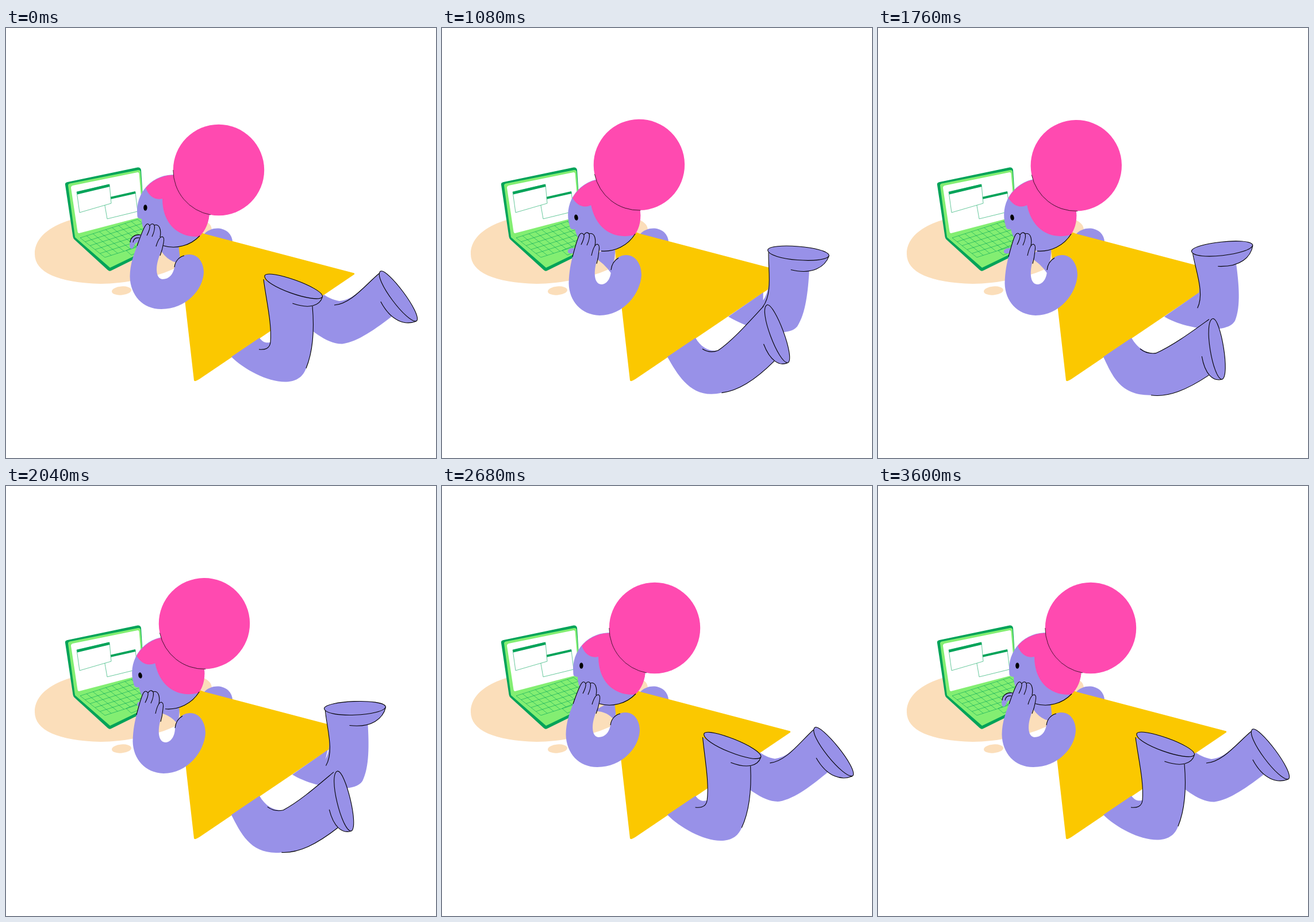
Recreate the animation shown at these times as an HTML page with a canvas. Size 748 px wide and 748 px high, loop 3640 ms.

```html
<!DOCTYPE html>
<html lang="en">
<head>
<meta charset="utf-8">
<title>Reading on the floor</title>
<style>
  html, body { margin: 0; width: 100%; height: 100%; overflow: hidden; background: #fff; }
  canvas { display: block; width: 748px; height: 748px; }
</style>
</head>
<body>
<canvas width="748" height="748"></canvas>
<script>
const ctx = document.querySelector('canvas').getContext('2d');
const LOOP = 3640, STEP = 40;
const SKIN = '#9891e8', PINK = '#ff4ab0', YELLOW = '#fbc800', PEACH = '#fbdeba';
const LIME = '#83ee72', GREEN = '#00a359', INK = '#000';
const rad = Math.PI / 180;

const fill = (d, color) => { ctx.fillStyle = color; ctx.fill(new Path2D(d)); };
const line = (d, color = INK, width = 1.1) => {
  ctx.strokeStyle = color;
  ctx.lineWidth = width;
  ctx.stroke(new Path2D(d));
};
const oval = (x, y, rx, ry, angle, color) => {
  ctx.beginPath();
  ctx.ellipse(x, y, rx, ry, angle * rad, 0, 7);
  ctx.fillStyle = color;
  ctx.fill();
};
const placed = (draw, x, y, angle) => {
  ctx.save();
  ctx.translate(x, y);
  ctx.rotate(angle * rad);
  draw();
  ctx.restore();
};

const lerp = (a, b, k) => a + (b - a) * k;
// Blends two paths that share the same commands.
const mix = (a, b, k) => {
  const ends = b.match(/-?[\d.]+/g);
  let i = 0;
  return a.replace(/-?[\d.]+/g, n => lerp(+n, +ends[i++], k).toFixed(2));
};
// Symmetric ease in and out between two times.
const ease = (t, from, to, power = 3) => {
  const u = Math.min(1, Math.max(0, (t - from) / (to - from)));
  return u < .5 ? (2 * u) ** power / 2 : 1 - (2 - 2 * u) ** power / 2;
};
// Turns a point around a joint and returns it as path text.
const joint = (cx, cy, angle) => (x, y) => {
  const c = Math.cos(angle * rad), s = Math.sin(angle * rad), dx = x - cx, dy = y - cy;
  return ` ${(cx + dx * c - dy * s).toFixed(2)} ${(cy + dx * s + dy * c).toFixed(2)} `;
};

function drawLaptop() {
  fill('M103 273Q102 269 107 268L229 242.5Q234 242 235 247L240 325L262 383L183 422Q180 424 177 421L119 368Q117 366 116.5 363Z', GREEN);
  fill('M108 274Q108 271 111 270.5L230 247Q234 247 234 250L240 325L262 378L181 417L120 364Z', LIME);
  fill('M113 278Q113 275 116 274L229 251Q231 251 231.5 253L238 328L127 357Q125 357 124.5 354Z', '#fff');
  line('M172 309L176 332L229 319L225 286L172 298Z', GREEN, .6);
  fill('M172 296L225 284L225.5 288L172 300Z', GREEN);
  fill('M123 285L180 272L183 305L128 321Z', '#fff');
  line('M123 285L180 272L183 305L128 321Z', GREEN, .6);
  fill('M123 285L179.5 271.5L180.5 276L124 289.5Z', GREEN);

  const key = (u, v) => `${129 + 100 * u + 43 * v} ${365 - 32 * u + 34 * v}`;
  let grid = '';
  for (let i = 0; i <= 5; i++) grid += `M${key(0, i / 5)}L${key(1, i / 5)}`;
  for (let i = 0; i <= 9; i++) grid += `M${key(i / 9, 0)}L${key(i / 9, 1)}`;
  line(grid + 'M209 387L218 395L246 383L238 375Z', GREEN, .6);
}

function drawFarArm(t, head) {
  const hide = t < 2700 ? ease(t, 1700, 2300) : 1 - ease(t, 3200, 3600);
  const pose = (rest, low, tucked) => mix(mix(rest, low, head), tucked, hide);
  fill(pose(
    'M262 375Q278 407 302 409L304 370Z',
    'M262 398Q282 408 296 429L304 370Z',
    'M262 392Q287 390 301 409L304 370Z'), SKIN);
  fill(pose(
    'M235 359C224 358 217 365 216 372C214 380 216 384 219 384C223 383 222 376 228 373L240 375Z',
    'M235 383C224 382 219 385 219 388C218 391 222 393 226 392C228 392 229 392 230 392L240 392Z',
    'M244 370C235 370 233 372 233 375C233 379 235 380 237 380C238 380 239 380 240 380L245 380Z'), SKIN);
  ctx.globalAlpha = Math.max(0, 1 - 2 * head) * (1 - hide);
  line('M234 360C224 358 216 365 216 373M232 365C224 364 222 368 221 373');
  ctx.globalAlpha = 1;
}

function drawHead(t, turn) {
  const angle = -11.9 * turn;
  placed(() => {
    ctx.translate(-320, -364);
    fill('M228 318A63 63 0 1 1 260 373C244 362 236 350 236 332Q230 332 228.5 328Z', SKIN);
    fill('M243 278A63 63 0 0 1 354 318C354 337 347 353 336 363C300 365 272 341 272 297C258 300 248 292 243 278Z', PINK);
    line('M273 378.5A63 63 0 0 0 337 361.5');
    oval(242.4, 312.5, 3.2, 5.2, 0, INK);
  }, 320, 364, angle);

  // The bun swings a little further than the head, then settles.
  const u = (t - 660) / 460;
  const swing = u > 0 && u < 1 ? Math.sin(Math.PI * u) : 0;
  placed(() => {
    oval(50, -117, 79.2, 79.2, 0, PINK);
    line('M-29.2 -117A79.2 79.2 0 0 0 36 -39', INK, .7);
  }, 320 - 7 * swing, 364 - 4.8 * swing, angle);
}

function drawNearArm(drop) {
  fill(mix(
    'M228 379C233 365 238 350 243 343Q247 338 250 344Q254 338 258 343Q264 341 267 347Q270 354 268 364Q272 360 275 367C275 380 269 388 265 402C260 418 261 436 272 437C284 437 291 428 293 416C295 402 306 394 320 394C334 394 344 408 344 425C343 455 313 489 270 489C238 489 216 465 215.5 432C216 410 222 395 228 379Z',
    'M227 398C231 383 235 367 239 360Q243 354 247 360Q251 353 256 358Q262 356 265 362Q268 368 266 379Q270 373 273.5 380C274 392 270 400 267 414C264 430 266 446 278 446C288 445 294 434 294 421C297 403 308 395 321 395C336 395 347 410 347 430C345 462 316 500 274 500C242 499 221 475 220.5 444C221 424 224 410 227 398Z',
    drop), SKIN);
  line(mix(
    'M228 379C233 365 238 350 243 343Q247 338 250 344Q251 349 245 361M250 344Q254 338 258 343Q260 350 254 363M258 343Q264 341 267 347Q270 354 268 364M261 380Q266 363 272 363Q276 364 274 374Q272 386 268 396M293 416C294 406 301 398 310 396',
    'M227 398C231 383 235 367 239 360Q243 354 247 360Q248 365 242 377M247 360Q251 353 256 358Q258 365 252 378M256 358Q262 356 265 362Q268 368 266 379M260 396Q264 377 270 376Q275 377 273 388Q272 400 269 410M294 421C295 411 300 404 307 400',
    drop));
}

// Trouser opening: an ellipse with a cuff on the leg side.
function drawOpening(x, y, angle, cuff) {
  placed(() => {
    fill(cuff + 'L-50 0Z', SKIN);
    line(cuff);
    const rim = 'M-53.5 -2C-52 -15.5 50 -15.5 53.5 0C50 16 -52 16 -53.5 -2Z';
    fill(rim, SKIN);
    line(rim);
  }, x, y, angle);
}

function drawFarLeg(kick) {
  const turn = -59.9 * kick, at = joint(568, 498, turn);
  fill(`M498 502C530 522${at(555, 550)}${at(585, 549.5)}C${at(612, 546)}${at(645, 522)}${at(672, 501)}L${at(650, 427)}C${at(625, 447)}${at(608, 472)}${at(580, 475)}C${mix('570 473 562 470 553 464', '556 470 558 465 560 459', kick)}Z`, SKIN);
  line(`M${at(649, 427)}C${at(625, 447)}${at(600, 480)}${at(571, 482)}`);
  const [x, y] = at(682, 467).trim().split(' ').map(Number);
  drawOpening(x, y, 52.8 + turn, 'M53.5 1C48 20 28 36 -11 29.5');
}

function drawNearLeg(kick) {
  const turn = 61.4 * kick, at = joint(453, 580, turn);
  const heel = at(lerp(522, 515, kick), lerp(592, 589, kick));
  const back = `C${at(533, 565)}${at(537, 530)}${at(533, 484)}`;
  const front = `${at(448, 437)}C${at(452, 470)}${at(lerp(463, 458, kick), 515)}${at(lerp(460, 455, kick), 546.5)}`;
  fill(`M392 572C${mix('425 605', '408 606', kick)}${at(lerp(505, 490, kick), lerp(640, 636, kick))}${heel}${back}L${front}C${mix('452 549 446 546', '470 567 452 559', kick)} 441 539Z`, SKIN);
  line(`M${heel}${back}`);
  line(`M${front}C${mix('459 558 450 560 440 559', '472 567 462 563 456 558', kick)}`);
  const [x, y] = at(500, 450).trim().split(' ').map(Number);
  drawOpening(x, y, 19.1 + turn, 'M53.5 1C54 16 40 28 8 28');
}

function draw(t) {
  const head = ease(t, 440, 810) - ease(t, 1960, 2640);
  const arm = ease(t, 440, 1000) - ease(t, 2080, 2640);
  const kick = ease(t, 440, 1440) - ease(t, 1440, 3200, 5);

  ctx.clearRect(0, 0, 748, 748);
  fill('M50 393C50 350 110 325 190 322C290 318 357 325 358 350C358 372 330 402 296 417C262 434 205 445 165 445C90 443 50 425 50 393Z', PEACH);
  oval(201, 457, 17, 7.5, -5, PEACH);
  drawLaptop();
  fill('M345 358C360 342 391 346 394 371L380 385Z', SKIN);
  drawFarArm(t, head);
  fill('M300 376L327 613Q328 616 336 611L606 428.5V426.5L345 358L334 354Z', YELLOW);
  drawFarLeg(kick);
  drawNearLeg(kick);
  drawHead(t, head);
  drawNearArm(arm);
}

function tick() {
  draw(Math.floor(performance.now() % LOOP / STEP) * STEP);
  requestAnimationFrame(tick);
}
tick();
</script>
</body>
</html>
```
